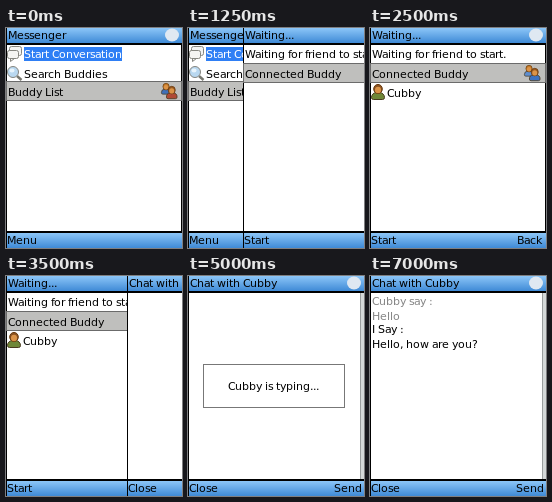
An HTML page with a canvas that plays this animation: 176x220 px, repeating every 8 s.

```html
<!DOCTYPE html>
<html lang="en">
<head>
<meta charset="utf-8">
<title>Messenger</title>
<style>
  html, body { margin: 0; width: 100%; height: 100%; overflow: hidden; background: #fff; }
  canvas { display: block; }
</style>
</head>
<body>
<canvas id="stage" width="176" height="220"></canvas>
<script>
const W = 176, H = 220, LOOP = 8000;
const FRIEND = 'Cubby';
const ctx = document.getElementById('stage').getContext('2d');

function rect(x, y, w, h, color) {
  ctx.fillStyle = color;
  ctx.fillRect(x, y, w, h);
}

function frame(x, y, w, h, fill, edge) {
  rect(x, y, w, h, edge);
  rect(x + 1, y + 1, w - 2, h - 2, fill);
}

function ellipse(x, y, rx, ry, fill, edge) {
  ctx.beginPath();
  ctx.ellipse(x, y, rx, ry, 0, 0, Math.PI * 2);
  ctx.fillStyle = fill;
  ctx.fill();
  if (edge) {
    ctx.strokeStyle = edge;
    ctx.lineWidth = 1;
    ctx.stroke();
  }
}

// Phone text: every glyph advances by whole pixels.
function text(str, x, y, color = '#000') {
  ctx.font = '11px "DejaVu Sans", sans-serif';
  ctx.fillStyle = color;
  for (const ch of str) {
    ctx.fillText(ch, x, y);
    x += Math.floor(ctx.measureText(ch).width + ('oe'.includes(ch) ? 0.3 : 0.05));
  }
}

function bar(y, h) {
  const g = ctx.createLinearGradient(0, y, 0, y + h);
  g.addColorStop(0, '#8cc6f8');
  g.addColorStop(1, '#3f8ad6');
  rect(0, y, W, h, g);
}

function person(x, y, shirt, hair, s = 1) {
  ctx.save();
  ctx.translate(x, y);
  ctx.scale(s, s);
  ctx.beginPath();
  ctx.roundRect(0.5, 8.5, 13, 7, [5, 5, 2, 2]);
  ctx.fillStyle = shirt;
  ctx.fill();
  ctx.strokeStyle = '#4a3a20';
  ctx.stroke();
  ellipse(7, 5, 4.3, 4.6, hair, '#6b3c10');
  ellipse(7, 6, 3, 3.2, '#dc9448');
  ctx.restore();
}

function group(x, y, left, right) {
  person(x, y, left, '#c47a28', 0.72);
  person(x + 5, y + 3, right, '#9a5a20', 0.82);
}

function bubble(x, y, w, h) {
  ctx.beginPath();
  ctx.roundRect(x, y, w, h, 2);
  ctx.moveTo(x + 3, y + h);
  ctx.lineTo(x + 3, y + h + 3);
  ctx.lineTo(x + 7, y + h);
  ctx.fillStyle = '#f4f4f2';
  ctx.fill();
  ctx.strokeStyle = '#85857f';
  ctx.lineWidth = 1;
  ctx.stroke();
}

function magnifier(x, y) {
  ctx.beginPath();
  ctx.moveTo(x + 10, y + 10);
  ctx.lineTo(x + 14.5, y + 14);
  ctx.strokeStyle = '#77776f';
  ctx.lineWidth = 2.5;
  ctx.stroke();
  ellipse(x + 6, y + 6, 5.5, 5.5, '#b9d8f0', '#85857f');
  ellipse(x + 5, y + 4.5, 2.5, 2, '#e8f4fc');
}

function chrome(title, leftKey, rightKey = '', rightX = 0) {
  rect(0, 0, W, H, '#fff');
  bar(0, 15);
  rect(0, 15, W, 2, '#000');
  rect(0, 203, W, 2, '#000');
  bar(205, 15);
  text(title, 2, 11);
  ellipse(166, 7, 7, 6.5, '#dfe8f2');
  text(leftKey, 1, 216);
  text(rightKey, rightX, 216);
  rect(0, 0, 1, H, '#000');
  rect(W - 1, 17, 1, 186, '#000');
}

function row(label, y) {
  frame(0, y, W, 20, '#bfbfbd', '#6b6b6b');
  text(label, 2, y + 15);
}

function menuScreen() {
  chrome('Messenger', 'Menu');
  bubble(3.5, 18.5, 12, 9);
  bubble(1.5, 22.5, 11, 8);
  rect(18, 19, 98, 14, '#2f7ff5');
  text('Start Conversation', 18, 30, '#fff');
  magnifier(1, 38);
  text('Search Buddies', 18, 50);
  row('Buddy List', 53);
  group(155, 55, '#3f70b8', '#b04a35');
}

function waitScreen(t) {
  chrome('Waiting...', 'Start', 'Back', 147);
  text('Waiting for friend to start.', 2, 30);
  row('Connected Buddy', 35);
  group(154, 37, '#5f8fd0', '#3d72c0');
  if (t >= 2500) {
    person(1, 56, '#6f8738', '#8a5222');
    text(FRIEND, 17, 69);
  }
}

function chatScreen(t) {
  chrome('Chat with ' + FRIEND, 'Close', 'Send', 146);
  rect(172, 17, 4, 186, '#d4d8d8');
  rect(172, 17, 1, 186, '#9a9e9e');
  if (t >= 5000 && t < 6000) {
    frame(15, 88, 142, 44, '#fff', '#777');
    text(FRIEND + ' is typing...', 40, 114);
  }
  if (t >= 6000) {
    text(FRIEND + ' say :', 2, 29, '#858585');
    text('Hello', 2, 44, '#858585');
  }
  if (t >= 7000) {
    text('I Say :', 2, 57);
    text('Hello, how are you?', 2, 72);
  }
}

// The new screen covers the old one in two hard steps.
function slideIn(screen, t, start) {
  if (t < start) return;
  const step = Math.floor((t - start) / 250);
  ctx.save();
  ctx.translate([121, 55][step] ?? 0, 0);
  screen(t);
  ctx.restore();
}

function draw(now) {
  const t = now % LOOP;
  menuScreen();
  slideIn(waitScreen, t, 1000);
  slideIn(chatScreen, t, 3500);
}

const origin = performance.now();
function tick() {
  draw(performance.now() - origin);
  requestAnimationFrame(tick);
}
tick();
</script>
</body>
</html>
```
